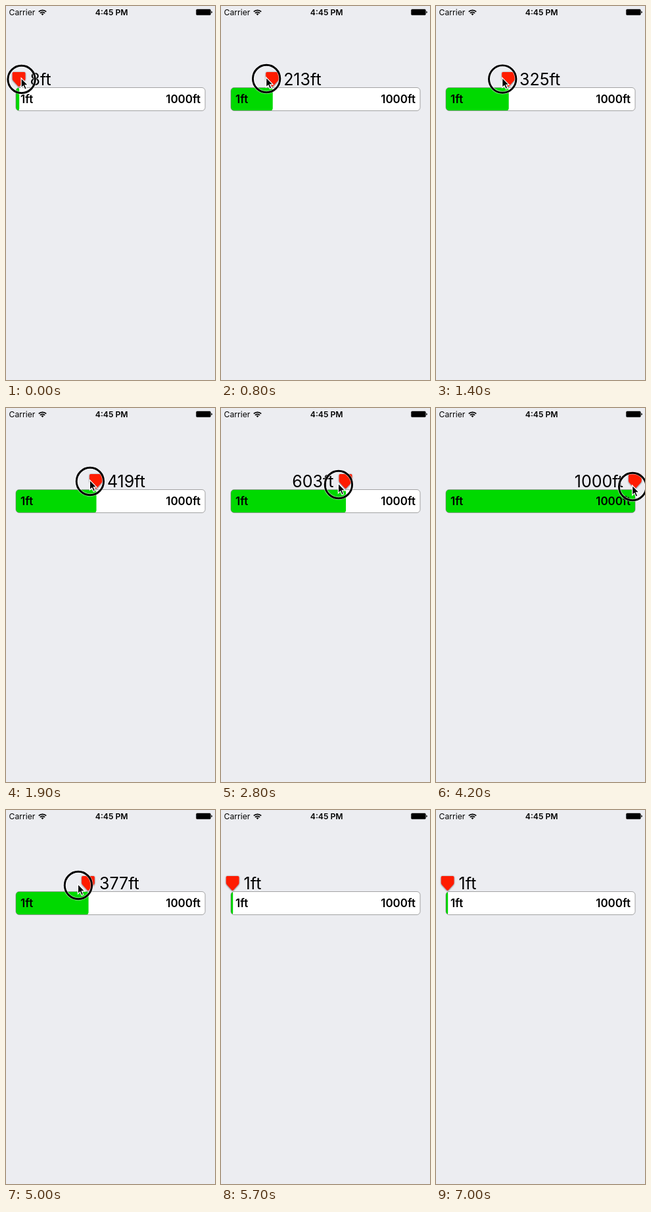
Recreate the animation shown at these times as an HTML page. Size 318 by 566 pixels, loop 7500 ms.

```html
<!DOCTYPE html>
<html lang="en">
<head>
<meta charset="utf-8">
<title>Distance slider</title>
<style>
  html, body { margin: 0; width: 100%; height: 100%; overflow: hidden; background: #ecedf1; }
  svg { display: block; width: 318px; height: 566px; font-family: Inter, Roboto, sans-serif; }
</style>
</head>
<body>
<svg viewBox="0 0 318 566">
  <defs>
    <filter id="shadow" x="-40%" y="-30%" width="180%" height="170%">
      <feDropShadow dx="0" dy=".6" stdDeviation="1.3" flood-color="#000" flood-opacity=".7"/>
    </filter>
    <clipPath id="track"><rect x="15" y="123.5" width="288" height="35" rx="5"/></clipPath>
  </defs>
  <rect width="318" height="566" fill="#ecedf1"/>

  <g font-size="12.2">
    <text x="4.5" y="14">Carrier</text>
    <text x="160.7" y="14" text-anchor="middle" font-weight="600">4:45 PM</text>
  </g>
  <g transform="translate(.2 .6)">
    <path d="M49.6 8.1a8 8 0 0 1 11.4 0M51.7 10.3a5 5 0 0 1 7.2 0" fill="none" stroke="#000" stroke-width="1.7"/>
    <path d="M53.3 11.5L55.3 13.6 57.3 11.5a2.9 2.9 0 0 0-4 0z"/>
  </g>
  <rect x="289.4" y="4.9" width="22" height="8.8" rx="1.5" stroke="#000" stroke-opacity=".45" stroke-width=".8"/>
  <path d="M312.3 7.5q1.5 .4 1.5 1.8t-1.5 1.8z"/>

  <rect x="15" y="123.5" width="288" height="35" rx="5" fill="#fff"/>
  <g clip-path="url(#track)"><rect id="fill" x="15" y="123.5" height="35" rx="4" fill="#00d900"/></g>
  <rect x="15" y="123.5" width="288" height="35" rx="5" fill="none" stroke="#777" stroke-opacity=".65"/>
  <g font-size="17" font-weight="600">
    <text x="22" y="147">1ft</text>
    <text x="296" y="147" text-anchor="end">1000ft</text>
  </g>

  <path id="pin" filter="url(#shadow)" fill="#ff1a00"
    d="M-8.2 100H8.2Q9.8 100 9.8 101.6V110.3Q9.8 111.7 8.8 112.8L1.1 121.3Q0 122.3 -1.1 121.3L-8.8 112.8Q-9.8 111.7 -9.8 110.3V101.6Q-9.8 100 -8.2 100z"/>
  <text id="label" y="120" font-size="25"></text>

  <g id="cursor">
    <circle r="20.7" fill="none" stroke="#fff" stroke-opacity=".6" stroke-width="4.6"/>
    <circle r="20.7" fill="none" stroke="#000" stroke-width="2.9"/>
    <path d="M-.5-2V13l3.3-3.1 2.3 5.3 2.6-1.1-2.3-5.2h4.6z" stroke="#fff" stroke-width="1.2"/>
  </g>
</svg>
<script>
const LOOP = 7500, STEP = 100;

// Drag path: time, feet (may overshoot the scale), cursor height
const path = [
  [100, 8, 111], [800, 213, 110], [1900, 419, 111], [2800, 603, 116], [2900, 603, 116],
  [4200, 1034, 119], [4300, 1034, 119], [4500, 902, 118], [5000, 377, 114], [5700, -270, 106]
];

const el = id => document.getElementById(id);
const fill = el("fill"), pin = el("pin"), label = el("label"), cursor = el("cursor");

const clamp = (v, lo, hi) => Math.min(hi, Math.max(lo, v));
const ramp = (t, from, to) => clamp((t - from) / (to - from), 0, 1);
const toX = feet => 17.6 + (feet - 1) * 0.2855;

function dragAt(t) {
  const n = Math.max(1, path.findIndex(([end], i) => end >= t || i === path.length - 1));
  const a = path[n - 1], b = path[n];
  const k = ramp(t, a[0], b[0]);
  return [1, 2].map(i => a[i] + (b[i] - a[i]) * k);
}

function draw(time) {
  const t = Math.floor((time % LOOP) / STEP) * STEP;
  const [raw, y] = dragAt(t);
  const feet = Math.round(clamp(raw, 1, 1000));
  const x = toX(feet);
  const onLeft = feet >= 480;
  // the grip slips behind the pin as the drag goes on
  const lag = -4 + 13 * ramp(t, 100, 800) + 6 * ramp(t, 2000, 5000);

  fill.setAttribute("width", x - 14.4);
  pin.setAttribute("transform", `translate(${x} 0)`);
  label.textContent = feet + "ft";
  label.setAttribute("x", onLeft ? x - 18 : x + 17);
  label.setAttribute("text-anchor", onLeft ? "end" : "start");
  cursor.setAttribute("transform", `translate(${toX(raw) - lag} ${y})`);
}

const start = performance.now();
function tick() {
  draw(performance.now() - start);
  requestAnimationFrame(tick);
}
tick();
</script>
</body>
</html>
```
